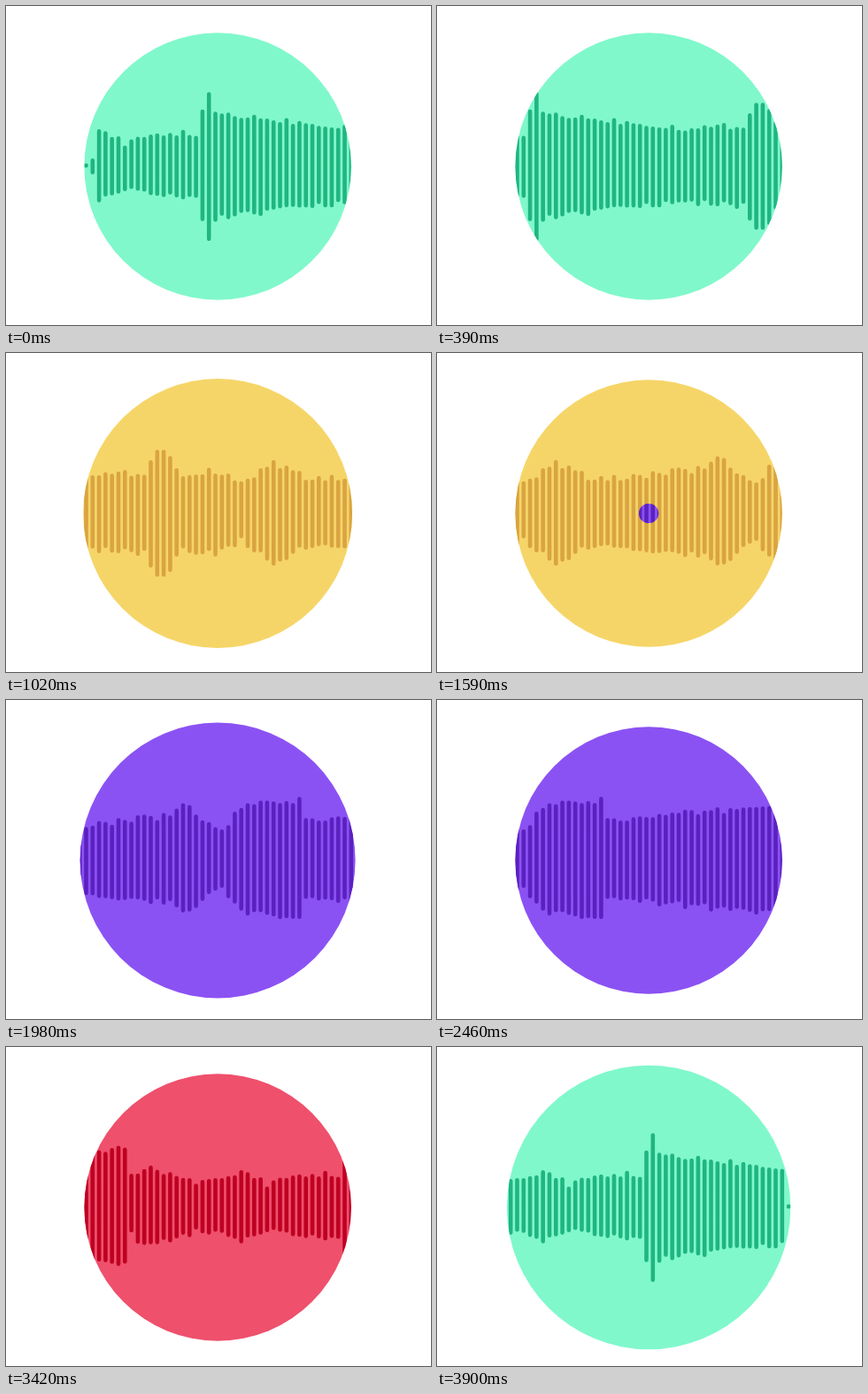
An HTML page with a canvas that plays this animation: 480 px wide and 360 px high, repeating every 3.96 s.

```html
<!DOCTYPE html>
<html lang="en">
<head>
<meta charset="utf-8">
<title>Sound wave</title>
<style>
  html, body { margin: 0; width: 100%; height: 100%; overflow: hidden; background: #fff; }
  canvas { display: block; width: 480px; height: 360px; }
</style>
</head>
<body>
<canvas id="stage" width="480" height="360"></canvas>
<script>
const ctx = document.getElementById('stage').getContext('2d');

const LOOP = 3960;
const CX = 239.1, CY = 181, RADIUS = 150.7, PEAK = 166;
const AXIS = 180, LEFT = 90.5, PITCH = 7.3, BAR = 4.6;
const PERIOD = 163, LAST = 203;
const GROW = 0.3, SETTLE = 0.23, LEAD = 0.425;

const themes = [
  { fill: '#80f8cc', bar: '#20b582' },
  { fill: '#f6d568', bar: '#d9a441' },
  { fill: '#8b52f3', bar: '#5b21c0' },
  { fill: '#ef506c', bar: '#be0022' }
];

// Loudness key points: bar number, half height.
const loudness = [
  [2, 42], [6, 25], [12, 37], [17, 36], [19, 83], [20, 60], [27, 54],
  [43, 42], [51, 46], [53, 72], [55, 66], [57, 41], [62, 48], [66, 33],
  [71, 57], [77, 37], [94, 50], [96, 63], [102, 31], [105, 60], [114, 68],
  [115, 44], [147, 66], [148, 33], [150, 45], [159, 27], [164, 34]
];

function jitter(seed) {
  const v = Math.sin(seed * 12.9898) * 43758.5453;
  return (v - Math.floor(v) - 0.5) * 8;
}

function level(i) {
  const next = Math.max(1, loudness.findIndex(p => p[0] >= i));
  const [i0, h0] = loudness[next - 1];
  const [i1, h1] = loudness[next];
  return h0 + (h1 - h0) * (i - i0) / (i1 - i0);
}

// The wave repeats, with a dot at either end.
function makeBar(i) {
  if (i === 0 || i === LAST) return { up: 2.5, down: 2.5 };
  if (i === 1) return { up: 8, down: 10 };
  const k = i > PERIOD + 1 ? i - PERIOD : i;
  return { up: level(k) + jitter(2 * k), down: level(k) + jitter(2 * k + 1) };
}

const wave = Array.from({ length: LAST + 1 }, (_, i) => makeBar(i));

function drawDisc(theme, radius, shift) {
  ctx.save();
  ctx.beginPath();
  ctx.arc(CX, CY, radius, 0, Math.PI * 2);
  ctx.fillStyle = theme.fill;
  ctx.fill();
  ctx.clip();
  ctx.strokeStyle = theme.bar;
  ctx.lineWidth = BAR;
  ctx.lineCap = 'round';
  ctx.beginPath();
  for (let slot = -2; slot < 45; slot++) {
    const bar = wave[slot + shift];
    if (!bar) continue;
    const x = LEFT + slot * PITCH;
    ctx.moveTo(x, AXIS - bar.up + BAR / 2);
    ctx.lineTo(x, AXIS + bar.down - BAR / 2);
  }
  ctx.stroke();
  ctx.restore();
}

// Grow past full size, then settle back.
function discRadius(age) {
  if (age < GROW) return PEAK * (1 - Math.cos(Math.PI * age / GROW)) / 2;
  const rest = Math.max(0, 1 - (age - GROW) / SETTLE);
  return RADIUS + (PEAK - RADIUS) * Math.pow(rest, 1.5);
}

function render(ms) {
  // Sixteen poses per second, each held until the next.
  const tick = Math.floor((Math.floor(ms / 30) * 30 + 58) / 62.7);
  const shift = Math.max(0, Math.round(2.604 * tick - 2.7));
  const time = tick / 16 + LEAD;
  const turn = Math.floor(time);
  const radius = turn ? discRadius(time - turn) : RADIUS;

  ctx.clearRect(0, 0, 480, 360);
  if (radius < RADIUS) drawDisc(themes[turn - 1], RADIUS, shift);
  drawDisc(themes[turn % themes.length], radius, shift);
}

const start = performance.now();
function loop() {
  render((performance.now() - start) % LOOP);
  requestAnimationFrame(loop);
}
loop();
</script>
</body>
</html>
```
